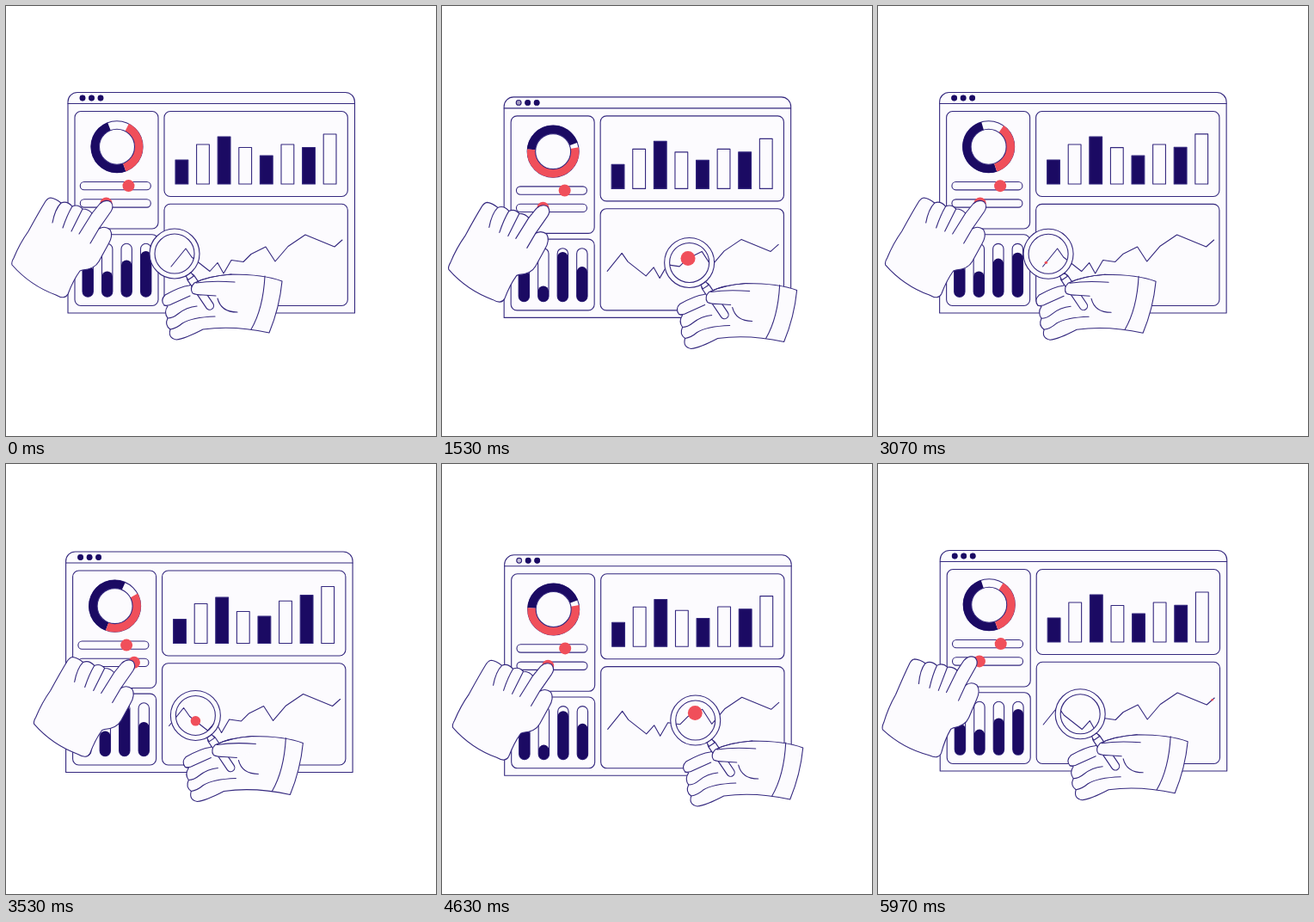
These frames come from a looping animation (500x500 px, 6.01 s). An HTML page:

```html
<!DOCTYPE html>
<html lang="en">
<head>
<meta charset="utf-8">
<title>Dashboard</title>
<style>
html, body { margin: 0; width: 100%; height: 100%; overflow: hidden; background: #fff; }
svg { display: block; width: 100vw; height: 100vh; }
.ink { fill: none; stroke: #35297f; stroke-width: 1.1; stroke-linecap: round; stroke-linejoin: round; }
.paper { fill: #fcfbfe; }
.navy { fill: #1b0a63; }
.red { fill: #f04f5a; }
.arc { fill: none; stroke-width: 10; }
</style>
</head>
<body>
<svg viewBox="0 0 500 500">
  <defs><clipPath id="glass"><circle id="glassClip" r="23"/></clipPath></defs>
  <g id="scene">
    <path class="ink paper" d="M72 357V111.500A11 11 0 0 1 83 100.500H394.500A11 11 0 0 1 405.500 111.500V357Z"/>
    <path class="ink" d="M72 113.500H405.500"/>
    <g id="lights"></g>
    <g id="panels"></g>
    <g transform="translate(129 163.700)">
      <circle class="ink paper" r="30"/>
      <path id="navyArc" class="arc" stroke="#1b0a63"/>
      <path id="redArc" class="arc" stroke="#f04f5a"/>
      <circle class="ink paper" r="20.500"/>
    </g>
    <g id="sliders"></g>
    <g id="bars"></g>
    <g id="pills"></g>
    <g id="trend">
      <polyline id="line" class="ink"/>
      <circle id="dot" class="red"/>
    </g>
    <g id="pointer">
      <path class="ink paper" d="M52 223Q58 224 64 229Q71 226 77 233Q84 230 89 236Q96 236 100 241L109 230Q116 224 122 228Q126 233 122 239L108 259Q115 255 121 260Q125 267 119 277L108 297Q103 306 89 307L86 308Q78 319 72 335Q68 342 58 336Q28 325 7 301Q6 298 9 293Q16 276 26 262Q38 240 46 227Q49 223 52 223Z"/>
      <path class="ink" d="M64 229Q57 236 54 252M77 233Q71 243 66 258M89 236L76 262M100 241L85 265M108 259L98 276"/>
    </g>
    <g id="magnifier">
      <circle class="ink paper" r="29"/>
      <circle class="ink paper" r="23"/>
    </g>
    <use href="#trend" clip-path="url(#glass)"/>
    <g id="holder">
      <g transform="translate(-196 -288)">
        <path class="ink paper" d="M213 325Q203 326 185 336Q179 342 184 348L188 349Q183 356 188 363Q184 371 191 376Q188 386 198 388Q208 387 229 376Q265 371 306 380Q318 351 321 320Q300 312 262 312Q235 314 219 322Z"/>
        <path class="ink" d="M184 348Q189 349 194 346L214 337M188 363Q194 363 200 358Q210 350 222 349M191 376Q198 375 205 369Q216 362 243 361M301 314Q299 352 285 376"/>
      </g>
      <g transform="rotate(56)" stroke-linecap="round">
        <path d="M34 0H73" stroke="#35297f" stroke-width="10.500"/>
        <path d="M34 0H73" stroke="#fcfbfe" stroke-width="8.200"/>
        <path class="ink paper" d="M29 -3.500V3.500L34 4V-4Z"/>
      </g>
      <g transform="translate(-196 -288)">
        <path class="paper" d="M262 313Q235 315 219 323Q213 328 217 334Q221 336 229 336L244 337L262 330Z"/>
        <path class="ink" d="M262 312Q235 314 219 322Q213 328 217 334Q221 336 229 336L244 337M221 322Q240 319 266 321M246 340Q250 356 269 356"/>
      </g>
    </g>
  </g>
</svg>
<script>
const CYCLE = 3005;
const $ = id => document.getElementById(id);
const set = (el, attrs) => { for (const k in attrs) el.setAttribute(k, attrs[k]); return el; };
const add = (parent, tag, attrs) =>
  $(parent).appendChild(set(document.createElementNS('http://www.w3.org/2000/svg', tag), attrs));
const box = (parent, cls, x, y, width, height, rx = 0) =>
  add(parent, 'rect', { class: cls, x, y, width, height, rx });
const place = (id, x, y) => set($(id), { transform: `translate(${x} ${y})` });

// Rises from 0 to 1 and back as p runs from 0 to 1; a higher power narrows the peak
const swell = (p, power) => Math.max(0, Math.sin(Math.PI * p)) ** power;
const dip = (p, at) => Math.min(1, 5 * Math.abs(p - at));

for (const [x, w] of [[80, 97], [184, 213.3]]) {
  const split = x < 100 ? 259 : 221.5, next = split + (x < 100 ? 6.7 : 8.8);
  box('panels', 'ink', x, 122.5, w, split - 122.5, 7);
  box('panels', 'ink', x, next, w, 348.5 - next, 7);
}
const lights = [89, 99.5, 110].map(cx => {
  add('lights', 'circle', { class: 'ink', cx, cy: 107, r: 2.9 });
  return add('lights', 'circle', { class: 'navy', cx, cy: 107, r: 3.2 });
});
const [, knob] = [209.1, 229.4].map(cy => {
  box('sliders', 'ink paper', 86.3, cy - 4.6, 82, 9.3, 4.6);
  return add('sliders', 'circle', { class: 'red', cx: 142.5, cy, r: 7 });
});

const bars = [
  { top: 179, swing: 0 }, { top: 161, swing: 0 }, { top: 152, swing: 2 }, { top: 164.5, swing: 7 },
  { top: 174, swing: 2 }, { top: 161, swing: -4 }, { top: 164.5, swing: -17 }, { top: 149, swing: -10 }
].map((bar, i) => ({
  ...bar, el: box('bars', i % 2 ? 'ink' : 'ink navy', 197 + i * 24.6, bar.top, 14.8, 207 - bar.top)
}));

const pills = [
  { top: 302, swing: 0, skew: 1 }, { top: 308.5, swing: 15, skew: 1.6 },
  { top: 295.5, swing: -20, skew: .6 }, { top: 285, swing: 17, skew: .6 }
].map((pill, i) => {
  const x = 89 + i * 22.5;
  box('pills', 'ink', x, 276.3, 12.4, 62, 6.2);
  return { ...pill, el: box('pills', 'navy', x, pill.top, 12.4, 38, 6.2) };
});

const points = [[192, 303], [209, 282], [216, 292], [237, 308.5], [246, 298.5], [253, 311], [262, 295.5],
  [276, 297.5], [285, 288.5], [302, 280], [313, 297], [328, 279.5], [348, 266], [382, 280], [391, 272]];
const line = set($('line'), { points: points.join(' ') });
const lineLength = line.getTotalLength();

function arc(from, to) {
  const at = deg => {
    const a = deg * Math.PI / 180;
    return `${25.3 * Math.sin(a)} ${-25.3 * Math.cos(a)}`;
  };
  return `M${at(from)}A25.3 25.3 0 ${+(to - from > 180)} 1 ${at(to)}`;
}

function drawCharts(p, half) {
  const opacities = [dip(p, .59), dip(half, .72), dip(half, .66)];
  lights.forEach((el, i) => set(el, { opacity: opacities[i] }));

  const gap = -21 + 91 * swell(p, 1.1);
  const red = 27 + 54 * swell(p, .7);
  const navy = 160 + 115 * swell(p, 1.6);
  set($('redArc'), { d: arc(red, navy) });
  set($('navyArc'), { d: arc(navy, gap + 360) });

  for (const { el, top, swing } of bars) {
    const y = top + swing * swell(half, 2);
    set(el, { y, height: 207 - y });
  }
  for (const { el, top, swing, skew } of pills) {
    const y = top + swing * swell(p ** skew, 2);
    set(el, { y, height: 338.3 - y });
  }

  const { x: cx, y: cy } = line.getPointAtLength(p * lineLength);
  set($('dot'), { cx, cy, r: 8.5 * swell(p, .6) });
}

// The finger pushes the knob right, then lifts off and swings back
function drawPointer(half) {
  const push = swell(half, 1.4);
  const lift = half > .5 ? swell(2 * half - 1, .5) : 0;
  set(knob, { cx: 116.5 + 41 * push });
  set($('pointer'), {
    transform: `translate(${120 + 33 * push - 26 * lift} ${228 - 7 * lift}) rotate(${-14 * lift}) translate(-120 -228)`
  });
}

// A slow sweep along the trend, then a quick dipping return
function drawMagnifier(p) {
  const turn = .9;
  let travel, drop;
  if (p < turn) {
    travel = (p / turn) ** 1.15;
    drop = 5.5 * Math.sin(1.2 * Math.PI * travel);
  } else {
    const back = (p - turn) / (1 - turn);
    travel = 1 - back ** 1.8;
    drop = 8 * swell(back, 1) - 3.2 * (1 - back);
  }
  const x = 196 + 176 * travel, y = 288 + drop;
  place('magnifier', x, y);
  place('holder', x, y);
  set($('glassClip'), { cx: x, cy: y });
}

function draw(time) {
  const p = time / CYCLE % 1, half = 2 * p % 1, angle = 2 * Math.PI * p;
  place('scene', -2.7 * Math.sin(angle), 2.7 * (1 - Math.cos(angle)));
  drawCharts(p, half);
  drawPointer(half);
  drawMagnifier(p);
}

const start = performance.now();
function tick() {
  draw(performance.now() - start);
  requestAnimationFrame(tick);
}
tick();
</script>
</body>
</html>
```
